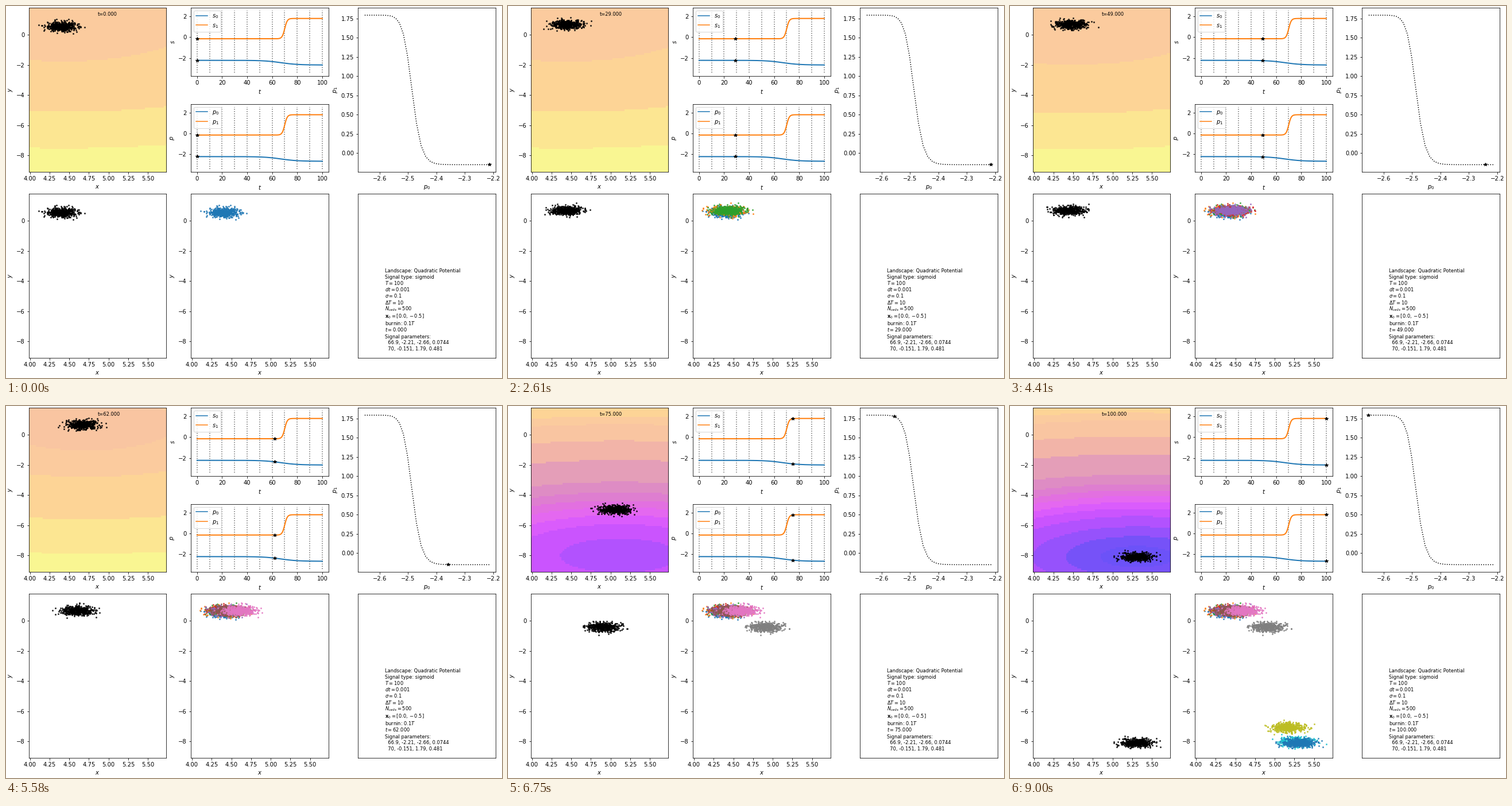
A matplotlib script that plays this animation: 864 by 648 pixels, repeating every 9.09 s.

```python
import numpy as np
import matplotlib.pyplot as plt
from matplotlib.animation import FuncAnimation
from matplotlib.colors import BoundaryNorm, ListedColormap

W, H, DPI = 864, 648, 72
FRAMES, INTERVAL = 101, 90
CELLS, SNAP = 500, 10
KX, KY, SIGMA = 0.5, 0.2215, 0.1
XLIM, YLIM = (3.985, 5.735), (-9.1, 1.795)
SMALL = 8.33

# Panel columns and rows in pixels
WIDTH, HEIGHT, HALF = 239.8, 286.4, 118.7
LEFT, MIDDLE, RIGHT = 39.6, 322, 613
TOP, BOTTOM = 3, 327

plt.rcParams.update({"font.family": "DejaVu Sans", "font.size": 10})


def sigmoid(t, tc, a, b, r):
    return a + 0.5 * (b - a) * (1 + np.tanh(r * (t - tc)))


def signal(t):
    return (sigmoid(t, 66.9, -2.214, -2.658, 0.0744),
            sigmoid(t, 70, -0.151, 1.793, 0.481))


def simulate(burnin=10, dt=0.05):
    """Cell positions at t = 0, 1, ..., 100 in a moving quadratic well."""
    rng = np.random.default_rng(4)
    rate = np.array([KX, KY])
    pos = np.tile([0.0, -0.5], (CELLS, 1))
    per_unit = round(1 / dt)
    states = []
    for i in range(-burnin * per_unit, 100 * per_unit + 1):
        if i >= 0 and i % per_unit == 0:
            states.append(pos.copy())
        push = np.array(signal(max(i, 0) * dt))
        noise = rng.standard_normal(pos.shape)
        pos = pos - (rate * pos + push) * dt + SIGMA * np.sqrt(dt) * noise
    return states


# Potential levels above the deepest point, and one colour per band
LEVELS = [-5, .03, .18, .42, .76, 1.1, 1.4, 1.75, 2.1, 2.55, 3.25,
          5.05, 7, 9, 10, 13.05, 16.8, 60]
COLOURS = ["#6c52f8", "#7652f8", "#9652fc", "#b252fe", "#ca54fe", "#da5cfc",
           "#e468f0", "#e270e0", "#de7ed0", "#de8cc4", "#e49eb8", "#f2b4a8",
           "#f9c5a1", "#fbcb9e", "#fdd496", "#fce692", "#f9f692"]
cmap = ListedColormap(COLOURS)
norm = BoundaryNorm(LEVELS, len(COLOURS))


def cell_centres(lim, n=100):
    edges = np.linspace(*lim, n + 1)
    return (edges[1:] + edges[:-1]) / 2


GX, GY = np.meshgrid(cell_centres(XLIM), cell_centres(YLIM))


def landscape(t):
    p0, p1 = signal(t)
    return 0.5 * KX * GX**2 + 0.5 * KY * GY**2 + p0 * GX + p1 * GY + 14.28


fig = plt.figure(figsize=(W / DPI, H / DPI), dpi=DPI, facecolor="white")


def panel(left, top, height=HEIGHT):
    return fig.add_axes([left / W, 1 - (top + height) / H,
                         WIDTH / W, height / H])


def cell_panel(left, top):
    ax = panel(left, top)
    ax.set(xlim=XLIM, ylim=YLIM, xlabel="$x$", ylabel="$y$",
           xticks=np.arange(4, 5.6, 0.25), yticks=range(-8, 1, 2))
    return ax


def dots(ax, colour, zorder=3):
    return ax.plot([], [], "o", ms=3, mew=0, color=colour,
                   alpha=0.8, zorder=zorder)[0]


def star(ax):
    return ax.plot([], [], "k*", ms=6, zorder=5)[0]


def signal_panel(top, name):
    ax = panel(MIDDLE, top, HALF)
    t = np.linspace(0, 100, 1001)
    for i, values in enumerate(signal(t)):
        ax.plot(t, values, lw=2, label=f"${name}_{i}$", zorder=2.5)
    ax.vlines(np.arange(0, 101, SNAP), -3.4, 2.52, colors="#666666",
              linestyles=":", lw=1.5, zorder=2)
    ax.set(xlim=(-5, 105), ylim=(-3.7, 2.82), xlabel="$t$", ylabel=f"${name}$",
           xticks=range(0, 101, 20), yticks=(-2, 0, 2))
    legend = ax.legend(loc="upper left")
    legend.set_zorder(6)
    plt.setp(legend.get_lines(), linewidth=1.5)
    return [star(ax), star(ax)]


# Line advances for plain text, formulas and bracketed formulas
PLAIN, MATH, TALL = 10.75, 11.2, 12.7
INFO = [
    (0, "Landscape: Quadratic Potential"),
    (PLAIN, "Signal type: sigmoid"),
    (MATH, "$T=100$"),
    (MATH, "$dt=0.001$"),
    (MATH, r"$\sigma=0.1$"),
    (MATH, r"$\Delta T=10$"),
    (MATH, "$N_{cells}=500$"),
    (TALL, r"$\mathbf{x}_0=[0.0, -0.5]$"),
    (TALL, "burnin: $0.1T$"),
    (MATH, "$t=0.000$"),
    (MATH, "Signal parameters:"),
    (PLAIN, "  66.9, -2.21, -2.66, 0.0744"),
    (PLAIN, "  70, -0.151, 1.79, 0.481"),
]


def info_lines(x, y):
    lines = []
    for advance, line in INFO:
        y += advance
        lines.append(fig.text(x / W, 1 - y / H, line, fontsize=SMALL))
    return lines


# Live cells over the landscape
live_ax = cell_panel(LEFT, TOP)
field = live_ax.imshow(landscape(0), extent=(*XLIM, *YLIM), origin="lower",
                       aspect="auto", interpolation="nearest",
                       cmap=cmap, norm=norm)
live = dots(live_ax, "black")
clock = live_ax.text(0.5, 0.95, "", fontsize=SMALL,
                     transform=live_ax.transAxes, zorder=6)

# Signals and parameters over time
signal_stars = signal_panel(TOP, "s")
param_stars = signal_panel(TOP + HEIGHT - HALF, "p")

# Path through parameter space
path_ax = panel(RIGHT, TOP)
path_ax.plot(*signal(np.arange(101)), "k:", lw=1.5)
path_ax.set(xlabel="$p_0$", ylabel="$p_1$",
            xticks=np.arange(-2.6, -2.15, 0.1),
            yticks=np.arange(0, 1.8, 0.25),
            xlim=(-2.6767, -2.192), ylim=(-0.248, 1.89))
path_star = star(path_ax)

# Latest snapshot, and all snapshots so far
latest = dots(cell_panel(LEFT, BOTTOM), "black")
history_ax = cell_panel(MIDDLE, BOTTOM)
history = [dots(history_ax, f"C{k % 10}", 3 + 0.1 * k) for k in range(11)]

panel(RIGHT, BOTTOM).set(xticks=[], yticks=[])
info_clock = info_lines(660, 464)[9]

cells = simulate()


def update(t):
    field.set_data(landscape(t))
    live.set_data(*cells[t].T)
    clock.set_text(f"t={t:.3f}")
    info_clock.set_text(f"$t={t:.3f}$")

    last = t // SNAP
    latest.set_data(*cells[last * SNAP].T)
    for k, group in enumerate(history):
        group.set_data(*(cells[k * SNAP].T if k <= last else ([], [])))

    p = signal(t)
    for stars in (signal_stars, param_stars):
        for mark, value in zip(stars, p):
            mark.set_data([t], [value])
    path_star.set_data([p[0]], [p[1]])
    return []


anim = FuncAnimation(fig, update, frames=FRAMES, interval=INTERVAL,
                     repeat=True, repeat_delay=0, blit=False)
plt.show()
```
